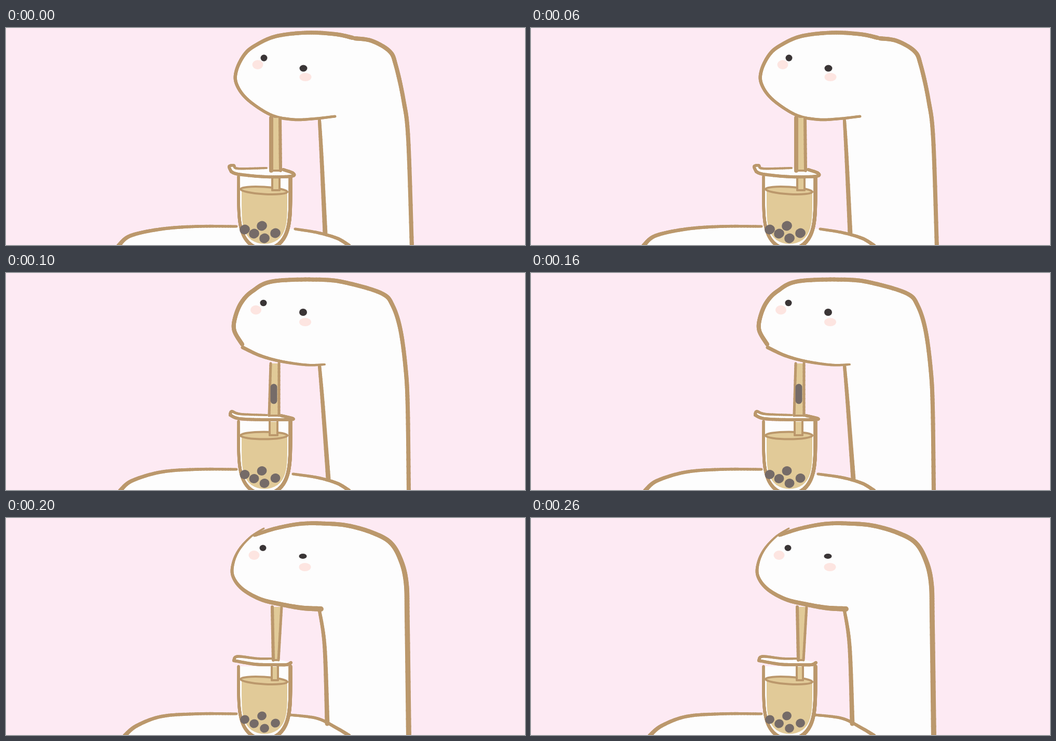
These frames come from a looping animation (1000x420 px, 300 ms). An HTML page with a canvas:

```html
<!DOCTYPE html>
<html lang="en">
<head>
<meta charset="utf-8">
<title>Bubble tea</title>
<style>
html, body { margin: 0; width: 100%; height: 100%; overflow: hidden; background: #fdeaf3; }
canvas { display: block; width: 1000px; height: 420px; }
</style>
</head>
<body>
<canvas id="stage" width="1000" height="420"></canvas>
<script>
const ctx = document.getElementById('stage').getContext('2d');
const PINK = '#fdeaf3', WHITE = '#fdfdfd', LINE = '#bb986c', TEA = '#e1ca98';
const PEARL = '#756b68', EYE = '#3a3536', BLUSH = '#fde5e1';
const HOLD = 100;

// Smooth curve through a few key points
function curve(pts, steps = 14) {
  const out = [];
  for (let i = 0; i < pts.length - 1; i++) {
    const a = pts[i - 1] || pts[i], b = pts[i], c = pts[i + 1], d = pts[i + 2] || c;
    for (let s = 0; s < steps; s++) {
      const t = s / steps;
      out.push([0, 1].map(k => 0.5 * (2 * b[k] + (c[k] - a[k]) * t
        + (2 * a[k] - 5 * b[k] + 4 * c[k] - d[k]) * t * t
        + (3 * b[k] - a[k] - 3 * c[k] + d[k]) * t * t * t)));
    }
  }
  out.push(pts[pts.length - 1]);
  return out;
}

// Round brush whose width goes evenly from one value to another
function brush(pts, from, to = from) {
  const p = curve(pts);
  ctx.strokeStyle = LINE;
  ctx.lineCap = 'round';
  for (let i = 1; i < p.length; i++) {
    ctx.lineWidth = from + (to - from) * i / p.length;
    ctx.beginPath();
    ctx.moveTo(...p[i - 1]);
    ctx.lineTo(...p[i]);
    ctx.stroke();
  }
}

function fill(pts, color) {
  ctx.fillStyle = color;
  ctx.beginPath();
  pts.forEach(p => ctx.lineTo(...p));
  ctx.fill();
}

function oval(color, x, y, rx, ry = rx, turn = 0) {
  ctx.fillStyle = color;
  ctx.beginPath();
  ctx.ellipse(x, y, rx, ry, turn, 0, Math.PI * 2);
  ctx.fill();
}

function drawBody({ chin, back, table, neck }) {
  const { start, crest, edge: [ex, ey] } = table;
  const left = [[start, 421], [start + 23, 402], [300, crest + 5], [370, crest], [444, crest]];
  const right = [[ex, ey], [600, ey + 7], [638, 407], [661, 421]];
  const front = [[604, 179], [neck.bend, 250], [neck.foot, 398]];

  fill([...curve(left), ...curve(right)], WHITE);
  fill([...curve(chin.pts), ...curve(back.pts), [neck.foot, 425], ...curve(front).reverse()], WHITE);
  brush(front, 6, 9);
  brush(chin.pts, ...chin.width);
  brush(back.pts, ...back.width);
  brush(left, 8, 5);
  brush(right, 5, 7);
}

function drawFace(i, lid) {
  oval(BLUSH, 485 - 3.5 * i, 71 + i / 2, 10.5, 9);
  oval(BLUSH, 577 - i / 2, 95, 11.5, 8);
  oval(EYE, 497 - i, 58, 6.5, 6.5 - i / 4);
  oval(EYE, 573 - i / 2, 78 - 2 * i, 7.5, lid);
}

// One wall of the rounded glass, side is -1 or 1
function wall(side, half, top, bottom) {
  const pts = [];
  for (let k = 0; k <= 16; k++) {
    const u = Math.sin(Math.PI / 2 * k / 16);
    pts.push([498 + side * half * Math.sqrt(1 - u ** 5), top + (bottom - top) * u]);
  }
  return pts;
}

function drawTube([l, r], [bl, br], top, end, wl, wr) {
  fill([[l, top], [r, top], [br, end], [bl, end]], TEA);
  brush([[l, top], [bl, end]], wl);
  brush([[r, top], [br, end]], wr);
  brush([[bl, end], [br, end]], 4);
}

function drawSurface(tilt, from, to) {
  ctx.strokeStyle = LINE;
  ctx.lineWidth = 4;
  ctx.beginPath();
  ctx.ellipse(497, 314.5, 45, 7, tilt, from, to);
  ctx.stroke();
}

function drawCup({ rim, lip, tilt, straw, dip, sip }, i) {
  const left = wall(-1, 50, 287, 428), right = wall(1, 50, 287, 428);
  fill([...left, ...right.reverse()], WHITE);
  fill([...wall(-1, 44, 315, 418), ...wall(1, 44, 315, 418).reverse()], TEA);
  oval(TEA, 497, 314.5, 45, 7, tilt);
  drawSurface(tilt, Math.PI, Math.PI * 2);
  drawTube(dip, dip, 288, 314, 4, 4);
  drawSurface(tilt, 0, Math.PI);
  brush(left, 5, 7);
  brush(right, 7);

  const size = 10 - i / 2;
  for (const [x, y] of [[460, 390], [478, 398], [493, 383], [498, 407], [519, 397]]) {
    oval(PEARL, x, y, size, size * 0.93, -0.4);
  }

  fill([...curve(rim), ...curve(lip).reverse()], WHITE);
  brush(rim, 6, 4);
  drawTube(...straw);
  brush(lip, 6);
  if (sip) {
    ctx.strokeStyle = PEARL;
    ctx.lineWidth = 13;
    ctx.beginPath();
    ctx.moveTo(516, sip - 13);
    ctx.lineTo(516, sip + 13);
    ctx.stroke();
  }
}

const tall = {
  chin: {
    pts: [[634, 171], [590, 176], [552, 177], [510, 168], [465, 138], [444, 108],
      [444, 82], [459, 52], [480, 34], [520, 16], [580, 9], [635, 12], [668, 19]],
    width: [5, 8]
  },
  back: {
    pts: [[672, 20], [705, 25], [739, 45], [751, 72], [766, 140], [775, 215], [782, 425]],
    width: [8, 8]
  },
  neck: { bend: 608, foot: 615 },
  table: { start: 217, crest: 384, edge: [557, 389] },
  rim: [[434, 278], [430, 268], [439, 266], [447, 272], [502, 271]],
  lip: [[434, 278], [448, 283], [500, 288], [549, 287], [553, 281], [534, 274]],
  tilt: 0.06,
  straw: [[511, 528], [511, 529], 174, 276, 8, 6],
  dip: [513, 527],
  lid: 6.5
};

const sipping = {
  chin: {
    pts: [[614, 177], [580, 178], [530, 171], [490, 160], [456, 144]],
    width: [4, 7]
  },
  back: {
    pts: [[455, 138], [440, 112], [441, 88], [453, 58], [475, 35], [515, 16], [610, 13],
      [665, 21], [725, 40], [745, 63], [760, 110], [770, 185], [774, 260], [776, 425]],
    width: [8, 8]
  },
  neck: { bend: 610, foot: 621 },
  table: { start: 220, crest: 380, edge: [553, 389] },
  rim: [[432, 275], [435, 268], [452, 273], [503, 275]],
  lip: [[432, 275], [450, 282], [500, 284], [553, 283], [530, 276]],
  tilt: 0,
  straw: [[510, 526], [507, 526], 175, 276, 5, 5],
  dip: [508, 523],
  sip: 234,
  lid: 7
};

const leaning = {
  chin: {
    pts: [[607, 176], [570, 174], [530, 167], [490, 157], [455, 137], [437, 112],
      [438, 86], [450, 60], [472, 36], [497, 20]],
    width: [10, 3]
  },
  back: {
    pts: [[479, 33], [520, 20], [570, 11], [620, 11], [660, 15], [705, 28], [740, 47],
      [760, 80], [771, 125], [773, 200], [776, 425]],
    width: [7, 10]
  },
  neck: { bend: 614, foot: 619 },
  table: { start: 229, crest: 379, edge: [547, 381] },
  rim: [[439, 276], [446, 268], [485, 272], [518, 272]],
  lip: [[439, 276], [480, 283], [515, 284], [540, 284], [549, 280]],
  tilt: 0.06,
  straw: [[513, 531], [515, 525], 172, 275, 6, 5],
  dip: [512, 524],
  lid: 5
};

const poses = [tall, sipping, leaning];

function draw(time) {
  const i = Math.floor(time / HOLD) % poses.length;
  ctx.fillStyle = PINK;
  ctx.fillRect(0, 0, 1000, 420);
  drawBody(poses[i]);
  drawCup(poses[i], i);
  drawFace(i, poses[i].lid);
}

const start = performance.now();
function tick() {
  draw(performance.now() - start);
  requestAnimationFrame(tick);
}
tick();
</script>
</body>
</html>
```
